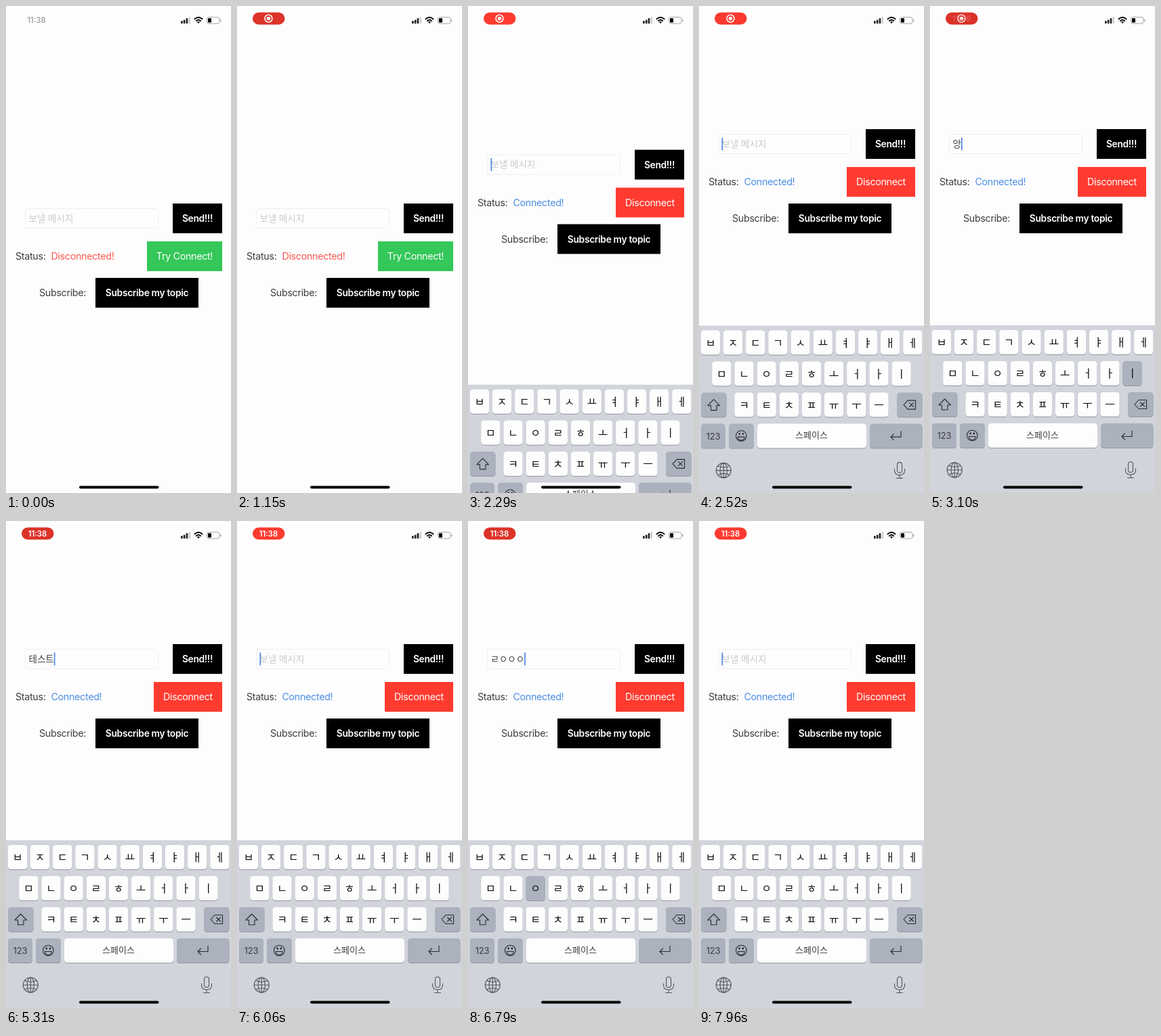
An HTML page for the animation above (7.99 s loop, 332 by 720 pixels).

```html
<!DOCTYPE html>
<html lang="ko">
<head>
<meta charset="utf-8">
<title>Socket demo</title>
<style>
  html, body { margin: 0; width: 100%; height: 100%; overflow: hidden; background: #fefdfe; }
  svg { display: block; width: 332px; height: 720px; }
  text { font: 14.3px Inter, "Open Sans", sans-serif; letter-spacing: -.33px; fill: #3c3c42; }
  .mid { text-anchor: middle; }
  .strong { font-size: 13.8px; font-weight: 600; }
  .ko { font: 13.5px "Noto Sans CJK KR", "Noto Sans CJK JP", "Noto Sans CJK", sans-serif; letter-spacing: 0; }
  .jamo { font-size: 16px; fill: #111; }
  .clock { font-size: 11.3px; font-weight: 600; letter-spacing: 0; }
  .line { fill: none; stroke: #2a2c32; stroke-width: 1.1; stroke-linecap: round; stroke-linejoin: round; }
  .wifi { stroke: #000; stroke-width: 1.9; }
</style>
</head>
<body>
<svg id="stage" viewBox="0 0 332 720"></svg>
<script>
const LOOP = 7990;
const KEY = '#fefdfe', GREY = '#abb1bd';
const CONNECT_AT = 1650, FOCUS_AT = 2150;

// [time, field text, key pressed]
const edits = [
  [FOCUS_AT, ''],
  [2700, 'ㅇ', 'ㅇ'], [2850, '아', 'ㅏ'], [3000, '앙', 'ㅇ'], [3130, '아이', 'ㅣ'],
  [3900, ''],
  [4300, 'ㅌ', 'ㅌ'], [4450, '테', 'ㅔ'], [4650, '텟', 'ㅅ'],
  [4800, '테스', 'ㅡ'], [5000, '테슽', 'ㅌ'], [5150, '테스트', 'ㅡ'],
  [5750, ''],
  [6250, 'ㄹ', 'ㄹ'], [6420, 'ㄹㅇ', 'ㅇ'], [6590, 'ㄹㅇㅇ', 'ㅇ'], [6760, 'ㄹㅇㅇㅇ', 'ㅇ'],
  [7550, '']
];

const box = (x, y, w, h, fill, extra = '') =>
  `<rect x="${x}" y="${y}" width="${w}" height="${h}" fill="${fill}" ${extra}/>`;
const label = (x, y, str, cls = '', extra = '') =>
  `<text x="${x}" y="${y}" class="${cls}" ${extra}>${str}</text>`;
const line = (d, cls = '') => `<path class="line ${cls}" d="${d}"/>`;
const button = (x, y, w, str, fill, cls = '') =>
  box(x, y, w, 44, fill) + label(x + w / 2, y + 27.3, str, 'mid ' + cls, 'style="fill:#fff"');
const key = (x, y, w, fill = KEY, name = '') =>
  box(x, y + 1, w, 36, '#9295a0', 'rx="4.5"') +
  box(x, y, w, 36, fill, `rx="4.5" data-key="${name}"`);

const letterRow = (letters, x0, y) => [...letters].map((c, i) => {
  const x = x0 + i * 33.15;
  return key(x, y, 28.3, KEY, c) + label(x + 14.2, y + 24, c, 'ko jamo mid');
}).join('');

const statusBar = `
  ${label(45, 25, '11:38', 'clock mid', 'id="idleClock"')}
  <g id="pill">
    <rect id="pillBox" x="23" y="9.5" width="47.5" height="18" rx="9"/>
    <g id="recIcon">
      <circle cx="46.5" cy="18.5" r="5.5" fill="none" stroke="#fff" stroke-width="1.5"/>
      <circle cx="46.5" cy="18.5" r="2.8" fill="#fff"/>
    </g>
    ${label(46.5, 22.6, '11:38', 'clock mid', 'id="pillClock" style="fill:#fff"')}
  </g>
  ${[4, 5.5, 8, 10].map((h, i) =>
    box(258 + i * 3.8, 26 - h, 2.7, h, i < 3 ? '#26262a' : '#cfcfd4', 'rx=".7"')).join('')}
  ${line('M278.5 19.3Q284 14.3 289.5 19.3M280.8 21.9Q284 19 287.2 21.9', 'wifi')}
  <path d="M282 23.6Q284 22 286 23.6L284 26Z"/>
  ${box(296.5, 16.5, 18.5, 9.5, 'none', 'rx="2.8" stroke="#a3a3a8"')}
  ${box(298, 18, 5, 6.5, '#000', 'rx="1.2"')}
  ${box(316, 19.7, 1.3, 3.3, '#a3a3a8', 'rx=".6"')}`;

const form = `<g id="form">
  ${box(28.5, 299.5, 196, 29, 'none', 'rx="3" stroke="#eeeef3"')}
  ${label(33.5, 318.7, '보낼 메시지', 'ko', 'id="hint" style="fill:#c9c9cf"')}
  ${label(33.5, 318.7, '', 'ko', 'id="typed"')}
  ${box(33.5, 304.5, 1.7, 19, '#4b86e0', 'id="caret"')}
  ${button(246, 292, 73, 'Send!!!', '#000', 'strong')}
  ${label(14, 375.2, 'Status:')}
  <g id="offline">
    ${label(66.5, 375.2, 'Disconnected!', '', 'style="fill:#fb5a50"')}
    ${button(208, 348, 111, 'Try Connect!', '#34c759')}
  </g>
  <g id="online">
    ${label(66.5, 375.2, 'Connected!', '', 'style="fill:#4a8fe2"')}
    ${button(218, 348, 101, 'Disconnect', '#ff3b30')}
  </g>
  ${label(49, 429.2, 'Subscribe:')}
  ${button(132, 402, 152, 'Subscribe my topic', '#000', 'strong')}
</g>`;

const keyboard = `<g id="keyboard">
  ${box(0, 472, 332, 248, '#d1d4db')}
  ${letterRow('ㅂㅈㄷㄱㅅㅛㅕㅑㅐㅔ', 2.8, 479)}
  ${letterRow('ㅁㄴㅇㄹㅎㅗㅓㅏㅣ', 19.2, 525)}
  ${key(3, 571, 37.5, GREY)}
  ${line('M21.7 581L13 590h4.5v7h8.5v-7h4.5Z')}
  ${letterRow('ㅋㅌㅊㅍㅠㅜㅡ', 52.4, 571)}
  ${key(292, 571, 37.5, GREY)}
  ${line('M302 589l6-6.5h11.5v13h-11.5ZM310.5 586l6 6m0-6l-6 6')}
  ${key(3, 617, 36, GREY)}${label(21, 640, '123', 'mid', 'style="font-size:13px"')}
  ${key(44, 617, 37, GREY)}
  <circle class="line" cx="62.3" cy="635" r="7.8"/>
  ${line('M57.3 636.5h10q-.5 5-5 5t-5-5Z')}
  <ellipse cx="59.7" cy="632" rx="1" ry="1.4"/><ellipse cx="64.9" cy="632" rx="1" ry="1.4"/>
  ${key(86, 617, 161, KEY)}${label(166, 638.5, '스페이스', 'ko mid', 'style="font-size:13px"')}
  ${key(252, 617, 77.5, GREY)}
  ${line('M298 628v8.5h-15m4.5-4.5l-4.5 4.5l4.5 4.5')}
  <g opacity=".75">
    <circle class="line" cx="36.3" cy="686" r="11"/>
    <ellipse class="line" cx="36.3" cy="686" rx="5.2" ry="11"/>
    ${line('M36.3 675v22M25.3 686h22M28 679.5q8.3 4 16.6 0M28 692.5q8.3-4 16.6 0')}
    <rect class="line" x="292.5" y="674" width="7" height="15.5" rx="3.5"/>
    ${line('M288.5 684v2q0 7 7.5 7t7.5-7v-2M296 693v4.5M291.5 697.5h9')}
  </g>
</g>`;

const stage = document.getElementById('stage');
stage.innerHTML = form + statusBar + keyboard + box(108, 709.5, 117.5, 4, '#000', 'rx="2"');

const el = {};
stage.querySelectorAll('[id]').forEach(node => el[node.id] = node);
const keys = [...stage.querySelectorAll('[data-key]')].filter(k => k.dataset.key);

const ramp = (t, start, length) => Math.min(1, Math.max(0, (t - start) / length));
const easeOut = x => 1 - (1 - x) ** 3;
const show = (node, on) => node.setAttribute('opacity', Number(on));
const shift = (node, y) => node.setAttribute('transform', `translate(0 ${y})`);

function drawStatus(t) {
  show(el.idleClock, .45 * (1 - ramp(t, 20, 150)));
  show(el.pill, ramp(t, 100, 250));
  const glow = (1 + Math.cos((t - 2290) / 1890 * 2 * Math.PI)) / 2;
  el.pillBox.setAttribute('fill',
    `rgb(${216 + 39 * glow} ${50 + 9 * glow} ${41 + 7 * glow})`);
  const swap = ramp(t, 3050, 300);
  show(el.recIcon, 1 - swap);
  show(el.pillClock, swap);
}

function drawField(t) {
  const [since, text] = edits.findLast(e => e[0] <= t) || [0, ''];
  if (el.typed.textContent !== text) el.typed.textContent = text;
  show(el.hint, !text);
  el.caret.setAttribute('x', 33.5 + (text ? el.typed.getComputedTextLength() : 0));
  show(el.caret, t >= FOCUS_AT && (t - since) % 1000 < 500);

  const press = edits.find(e => e[2] && t >= e[0] - 50 && t < e[0] + 70);
  for (const k of keys) k.setAttribute('fill', press && k.dataset.key === press[2] ? GREY : KEY);
}

function draw(t) {
  drawStatus(t);
  drawField(t);
  show(el.offline, t < CONNECT_AT);
  show(el.online, t >= CONNECT_AT);
  shift(el.form, -110 * easeOut(ramp(t, 2152, 400)));
  shift(el.keyboard, 248 * (1 - easeOut(ramp(t, 2174, 400))));
}

function tick() {
  draw(performance.now() % LOOP);
  requestAnimationFrame(tick);
}
tick();
</script>
</body>
</html>
```
